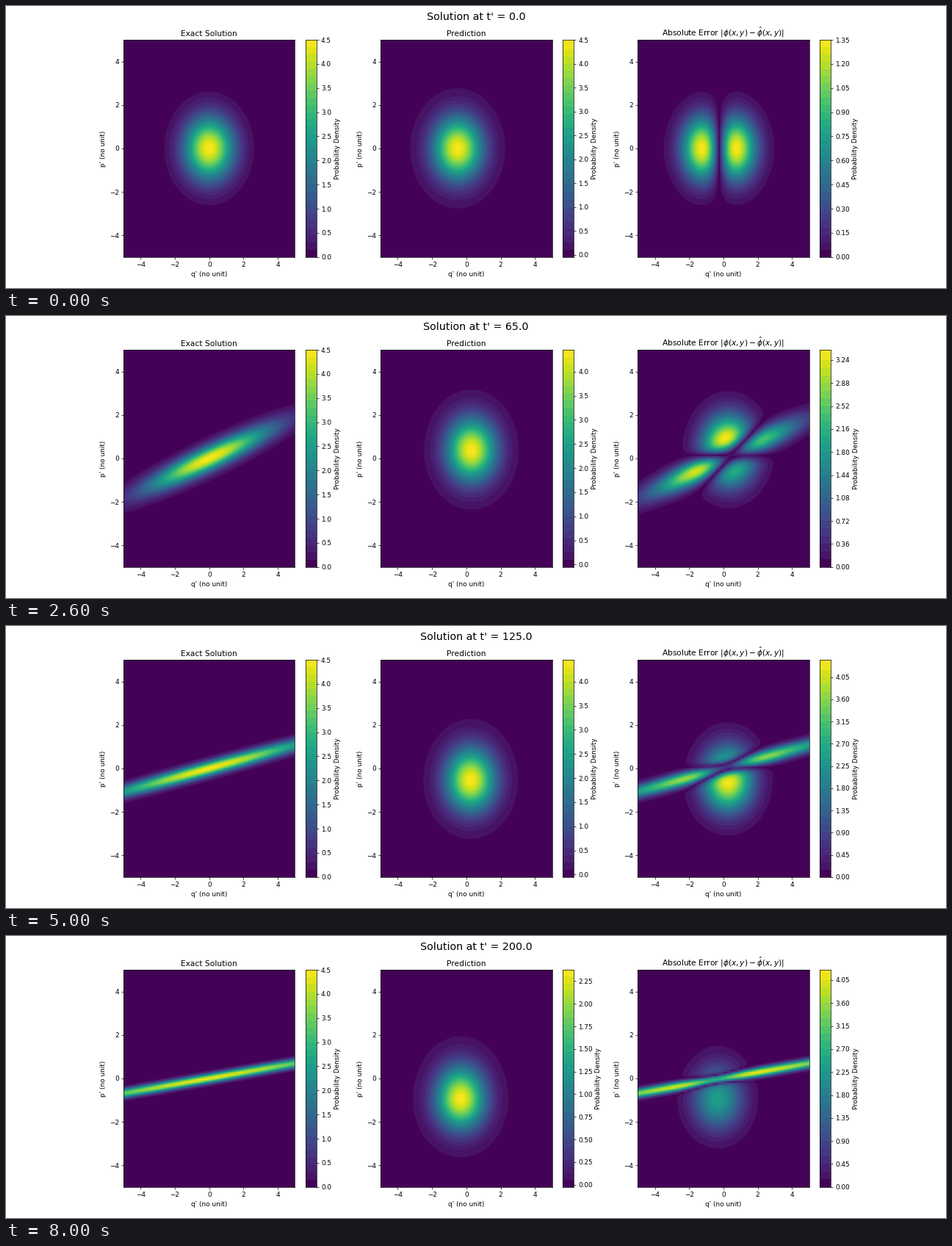
These frames come from a looping animation (1280x384 px, 8.2 s). A matplotlib script:

```python
import numpy as np
import matplotlib.pyplot as plt
from matplotlib.animation import FuncAnimation
from matplotlib.colors import ListedColormap
from matplotlib.ticker import FixedLocator, MaxNLocator

FRAMES, STEP_MS, DT = 41, 200, 5.0
PEAK = 4.485      # height of the exact density
SHEAR = 0.0354    # drift of q' per unit of p' and t'
BAND = 3          # fine levels that share one colour

axis = np.linspace(-5, 5, 100)
Q, P = np.meshgrid(axis, axis)
viridis = plt.get_cmap("viridis")

# Predicted blob over time: centre, height and vertical skew
KEY_T = np.array([0, 25, 65, 110, 145, 175, 200.0])
CX = np.array([-0.505, -0.343, 0.30, 0.38, 0.04, -0.20, -0.33])
CY = np.array([0, 0.39, 0.38, -0.37, -0.73, -0.88, -0.95])
HEIGHT = np.array([4.485, 4.435, 4.435, 4.435, 4.285, 3.425, 2.365])
SKEW = np.array([0, 0.01, 0.01, 0.012, 0.037, 0.037, 0.037])


def smooth(t, v):
    """Cubic Hermite curve through the key values."""
    m = np.gradient(v, KEY_T)
    i = min(np.searchsorted(KEY_T, t, "right") - 1, len(KEY_T) - 2)
    h = KEY_T[i + 1] - KEY_T[i]
    s = (t - KEY_T[i]) / h
    return ((1 + 2 * s) * (1 - s) ** 2 * v[i] + s * (1 - s) ** 2 * h * m[i]
            + s * s * (3 - 2 * s) * v[i + 1] + s * s * (s - 1) * h * m[i + 1])


def exact(t):
    return PEAK * np.exp(-((Q - SHEAR * t * P) ** 2 + P ** 2) / 2)


def predict(t):
    dx, dy = Q - smooth(t, CX), P - smooth(t, CY)
    k = np.interp(t, KEY_T, SKEW)
    dy = dy / np.where(dy > 0, 1 + k, 1 - k)
    return smooth(t, HEIGHT) * np.exp(-(dx ** 2 + dy ** 2) / 2)


def fine_levels(lo, hi):
    lev = MaxNLocator(101, min_n_ticks=1).tick_values(lo, hi)
    start = max(np.sum(lev < lo) - 1, 0)
    return lev[start:np.searchsorted(lev, hi, "right") + 1]


fig = plt.figure(figsize=(20, 6), dpi=64, facecolor="white")
heading = fig.suptitle("", fontsize=16)

CELL = 0.775 / 3.4
BOTTOM, TALL = 0.11, 0.77


def make_panel(col, title):
    x = 0.125 + 1.2 * CELL * col
    ax = fig.add_axes([x, BOTTOM, 0.8 * CELL, TALL])
    ax.set(title=title, xlabel="q' (no unit)", ylabel="p' (no unit)",
           xlim=(-5, 5), ylim=(-5, 5))
    bar = fig.add_axes([x + 0.85 * CELL, BOTTOM, TALL * 6 / 20 / 20, TALL])
    return ax, bar


panels = [make_panel(i, s) for i, s in enumerate((
    "Exact Solution",
    "Prediction",
    r"Absolute Error $|\phi(x, y) - \hat{\phi}(x, y)|$"))]
drawn = []


def draw_panel(ax, bar, z, lo):
    lev = fine_levels(lo, z.max())
    edges = np.append(lev[:-1:BAND], lev[-1])
    mids = (edges[:-1] + edges[1:]) / 2
    mids[0] = (lev[0] + lev[1]) / 2
    colors = viridis((mids - lev[0]) / (lev[-1] - lev[0]))

    ax.set_facecolor(colors[0])
    # Solid bands first, then smooth edges on top so no seams show
    for aa in (False, True):
        drawn.append(ax.contourf(Q, P, z, edges, colors=colors,
                                 antialiased=aa))

    bar.clear()
    bar.pcolormesh([0, 1], edges, np.arange(len(mids))[:, None],
                   cmap=ListedColormap(colors))
    bar.set(xticks=[], xlim=(0, 1), ylim=(lev[0], lev[-1]))
    bar.yaxis.tick_right()
    bar.yaxis.set_label_position("right")
    bar.yaxis.set_major_locator(FixedLocator(lev, nbins=10))
    bar.set_ylabel("Probability Density")


def update(i):
    while drawn:
        drawn.pop().remove()
    t = i * DT
    heading.set_text(f"Solution at t' = {t:.1f}")
    a, b = exact(t), predict(t)
    for (ax, bar), z, lo in zip(panels, (a, b, np.abs(a - b)), (0, -1e-4, 0)):
        draw_panel(ax, bar, z, lo)
    return []


anim = FuncAnimation(fig, update, frames=FRAMES, interval=STEP_MS,
                     init_func=lambda: [], repeat=True, repeat_delay=0,
                     blit=False)
plt.show()
```
